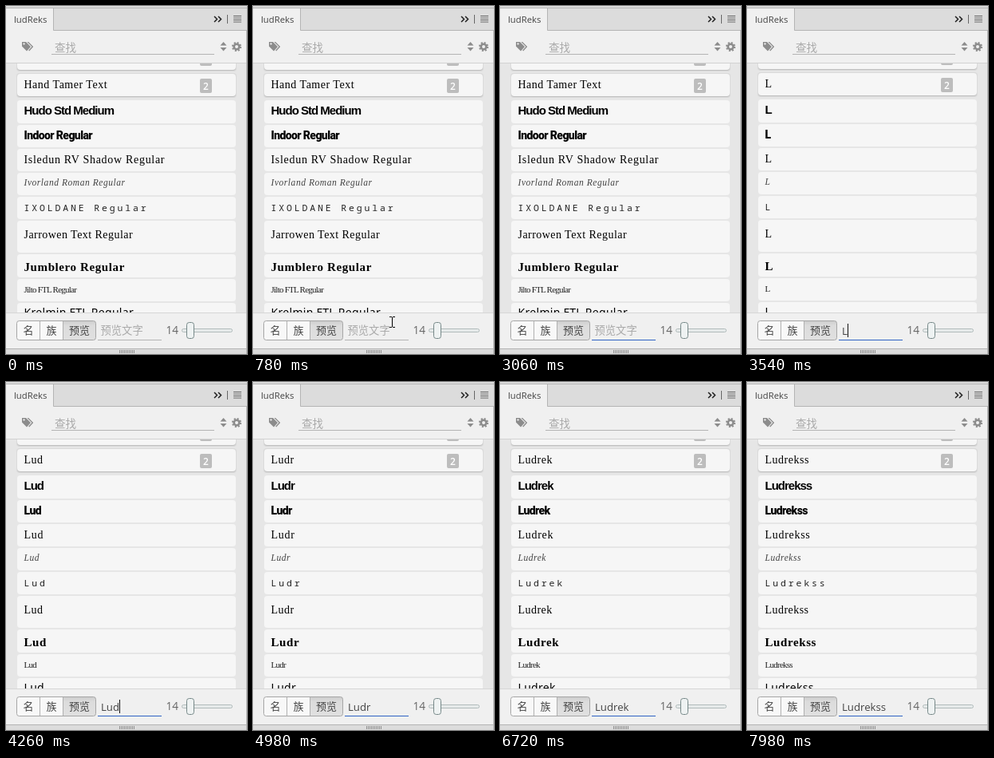
An HTML page for the animation above (8000 ms loop, 302x436 px).

```html
<!DOCTYPE html>
<html lang="zh-CN">
<head>
<meta charset="utf-8">
<title>Font panel</title>
<style>
  html, body { margin: 0; width: 100%; height: 100%; overflow: hidden; background: #e6e6e6; }
  svg { display: block; }
  text { font-family: "Open Sans", "Noto Sans", "Noto Sans CJK SC", "Noto Sans CJK", sans-serif; fill: #444; white-space: pre; }
  .hint { fill: #a9a9a9; }
  .line { fill: none; stroke: #b4b4b4; }
</style>
</head>
<body>
<svg width="302" height="436" viewBox="0 0 302 436">
  <defs>
    <clipPath id="view"><rect y="72" width="302" height="312"/></clipPath>
    <linearGradient id="pressed" x2="0" y2="1">
      <stop stop-color="#cdcdcd"/><stop offset=".25" stop-color="#dcdcdc"/><stop offset="1" stop-color="#e0e0e0"/>
    </linearGradient>
  </defs>

  <!-- Font list -->
  <g clip-path="url(#view)"><g id="list">
    <rect x="13" y="60" width="276" height="22" rx="4" fill="#dadada"/>
    <rect x="14" y="60" width="274" height="21" rx="4" fill="#c0c0c0"/>
    <rect x="14" y="60" width="274" height="20" rx="4" fill="#f6f6f6"/>
    <rect x="243" y="58" width="15" height="17" rx="2" fill="#bdbdbd"/>
    <rect x="13" y="84" width="276" height="31" rx="4" fill="#dadada"/>
    <rect x="14" y="86" width="274" height="28" rx="4" fill="#c0c0c0"/>
    <g id="cards" fill="#f6f6f6"></g>
    <rect x="243" y="91" width="15" height="18" rx="2" fill="#bdbdbd"/>
    <text x="250.5" y="104.5" text-anchor="middle" font-size="12" font-weight="600" style="fill:#fff">2</text>
    <g id="names"></g>
  </g></g>

  <!-- Tab bar -->
  <rect width="302" height="31" fill="#dcdcdc"/>
  <path class="line" d="M0 2.5H302M59.5 3V30.5H302"/>
  <rect y="3" width="59" height="29" fill="#f0f0f0"/>
  <text x="10" y="21" font-size="11.3">ludReks</text>
  <path d="M261 13l3.5 3.5-3.5 3.5M266 13l3.5 3.5-3.5 3.5" fill="none" stroke="#222" stroke-width="1.5"/>
  <path d="M277.5 11V22M285 12.5h10m-10 2.5h10m-10 2.5h10m-10 2.5h10" stroke="#666"/>

  <!-- Search row -->
  <rect y="31" width="302" height="41" fill="#f0f0f0"/>
  <path class="line" d="M57 60.5H261"/>
  <path d="M0 71.5H302" stroke="#d2d2d2"/>
  <g fill="#8c8c8c">
    <path fill-rule="evenodd" d="M20 45h5l6 6-5 5.5-6-6zM22.5 46.2a1.2 1.2 0 1 0 .1 0z"/>
    <path d="M26.5 45h1.7l6 6-5 5.5-1-1 4.2-4.5z"/>
    <path d="M268.5 49.5l4-4.5 4 4.5zM268.5 52l4 4.5 4-4.5z"/>
  </g>
  <circle cx="289" cy="51" r="3.3" fill="none" stroke="#8c8c8c" stroke-width="2.6"/>
  <circle cx="289" cy="51" r="5" fill="none" stroke="#8c8c8c" stroke-width="2.2" stroke-dasharray="1.964"/>
  <text class="hint" x="61" y="57" font-size="13.5">查找</text>

  <!-- Footer -->
  <rect y="384" width="302" height="52" fill="#f0f0f0"/>
  <path d="M0 384.5H302" stroke="#d6d6d6"/>
  <rect x="13.5" y="394.5" width="99" height="24" rx="3" fill="#f8f8f8"/>
  <path d="M71 394.5h38.5a3 3 0 0 1 3 3v18a3 3 0 0 1-3 3H71z" fill="url(#pressed)"/>
  <rect x="13.5" y="394.5" width="99" height="24" rx="3" fill="none" stroke="#a6a6a6"/>
  <path d="M42.5 395V418M71.5 395V418" stroke="#b0b0b0"/>
  <g text-anchor="middle" font-size="13">
    <text x="28" y="411">名</text><text x="57" y="411">族</text><text x="92" y="411">预览</text>
  </g>
  <text id="hint" class="hint" x="118.5" y="411" font-size="13.3">预览文字</text>
  <text id="entry" x="119" y="411.5" font-size="13.2"></text>
  <rect id="underline" x="115" y="418" width="80" height="1"/>
  <rect id="caret" y="398" width="1" height="17" fill="#111"/>
  <text x="200.5" y="411" font-size="13.7" style="fill:#666">14</text>
  <rect x="220.5" y="404.5" width="63" height="4" rx="2" fill="#e6eaea" stroke="#b2bcbc"/>
  <rect x="226.5" y="396.5" width="9" height="20" rx="3" fill="#eef2f2" stroke="#768888"/>
  <rect y="429" width="302" height="7" fill="#dcdcdc"/>
  <path class="line" d="M0 429.5H302M301.5 31V436"/>
  <path d="M142 433H161" stroke="#909090" stroke-width="4" stroke-dasharray="1"/>

  <!-- Pointers -->
  <path id="arrow" d="M.5 .5V14.5L4 11.5 6.3 16.5 8.5 15.5 6.3 10.8H10.5z" fill="#fff" stroke="#111"/>
  <path id="beam" d="M-3-6.5H0M1-6.5H4M.5-6V6M-3 6.5H0M1 6.5H4" stroke="#000"/>
</svg>
<script>
const $ = id => document.getElementById(id);
const svgNode = (parent, tag, attrs) => {
  const node = document.createElementNS("http://www.w3.org/2000/svg", tag);
  for (const key in attrs) node.setAttribute(key, attrs[key]);
  return parent.appendChild(node);
};

const LOOP = 8000, BLINK = 480, FOCUS = 1620;
const WORD = "Ludrekss";
const KEYS = [3540, 3900, 4260, 4500, 5280, 6240, 7020, 7500];
const SERIF = '"Liberation Serif", serif';

// name, card top, card height, baseline, font, letter spacing, colour
const ROWS = [
  ["Hand Tamer Text", 85, 28, 103, `14px ${SERIF}`, .5],
  ["Hudo Std Medium", 118, 29, 136, 'bold 15px "Liberation Sans", sans-serif', -1],
  ["Indoor Regular", 149, 28, 167, "900 14px Roboto, sans-serif", -.6],
  ["Isledun RV Shadow Regular", 179, 28, 197, `14px ${SERIF}`, .7],
  ["Ivorland Roman Regular", 209, 28, 225, `italic 11.5px ${SERIF}`, .55, "#444"],
  ["IXOLDANE Regular", 239, 28, 257, '300 11.5px "Noto Sans Mono", monospace', 2.85, "#222"],
  ["Jarrowen Text Regular", 269, 40, 291, `14px ${SERIF}`, .45],
  ["Jumblero Regular", 311, 29, 332, `bold 15px ${SERIF}`, .6],
  ["Jilto FTL Regular", 342, 28, 359, `11px ${SERIF}`, -.75, "#222"],
  ["Krelmin FTL Regular", 372, 29, 389, '14px "Noto Sans", sans-serif', .3],
];

// time, x, y, shape (none hides the pointer)
const POINTER = [
  [0], [300, 298, 338, "arrow"], [360],
  [600, 284, 398, "arrow"], [660, 243, 396, "arrow"], [720, 203, 392, "arrow"],
  [780, 174, 396, "beam"], [840, 169, 397, "beam"], [900, 169, 400, "beam"], [960, 170, 402, "beam"],
  [1440, 172, 403, "beam"], [1500, 175, 404, "beam"], [1560, 178, 405, "beam"], [1620, 179, 405, "beam"],
  [1980, 180, 406, "beam"], [2040, 190, 408, "beam"], [2100, 206, 410, "arrow"], [2160],
];

const labels = ROWS.map(([name, top, height, baseline, font, spacing, colour = "#000"]) => {
  svgNode($("cards"), "rect", { x: 14, y: top, width: 274, height, rx: 4 });
  return svgNode($("names"), "text", {
    x: 22.5, y: baseline, style: `font:${font};letter-spacing:${spacing}px;fill:${colour}`,
  });
});

let shown = -1;
function setText(count) {
  if (count === shown) return;
  shown = count;
  const typed = WORD.slice(0, count);
  labels.forEach((label, i) => label.textContent = typed || ROWS[i][0]);
  $("entry").textContent = typed;
  $("hint").style.display = typed ? "none" : "";
  $("list").setAttribute("transform", `translate(0 ${typed ? -1 : 0})`);
}

function draw() {
  const t = performance.now() % LOOP;
  const count = KEYS.filter(key => key <= t).length;
  setText(count);

  const focused = t >= FOCUS;
  $("underline").setAttribute("fill", focused ? "#2f62c4" : "#b4b4b4");

  const since = t - (count ? KEYS[count - 1] : FOCUS);
  const caretOn = focused && Math.floor(since / BLINK) % 2 === 0;
  $("caret").style.display = caretOn ? "" : "none";
  $("caret").setAttribute("x", 119 + Math.round(count ? $("entry").getComputedTextLength() : 0));

  const [, x, y, shape] = POINTER.filter(p => p[0] <= t).pop();
  for (const id of ["arrow", "beam"]) {
    $(id).style.display = id === shape ? "" : "none";
    if (id === shape) $(id).setAttribute("transform", `translate(${x} ${y})`);
  }
  requestAnimationFrame(draw);
}
draw();
</script>
</body>
</html>
```
